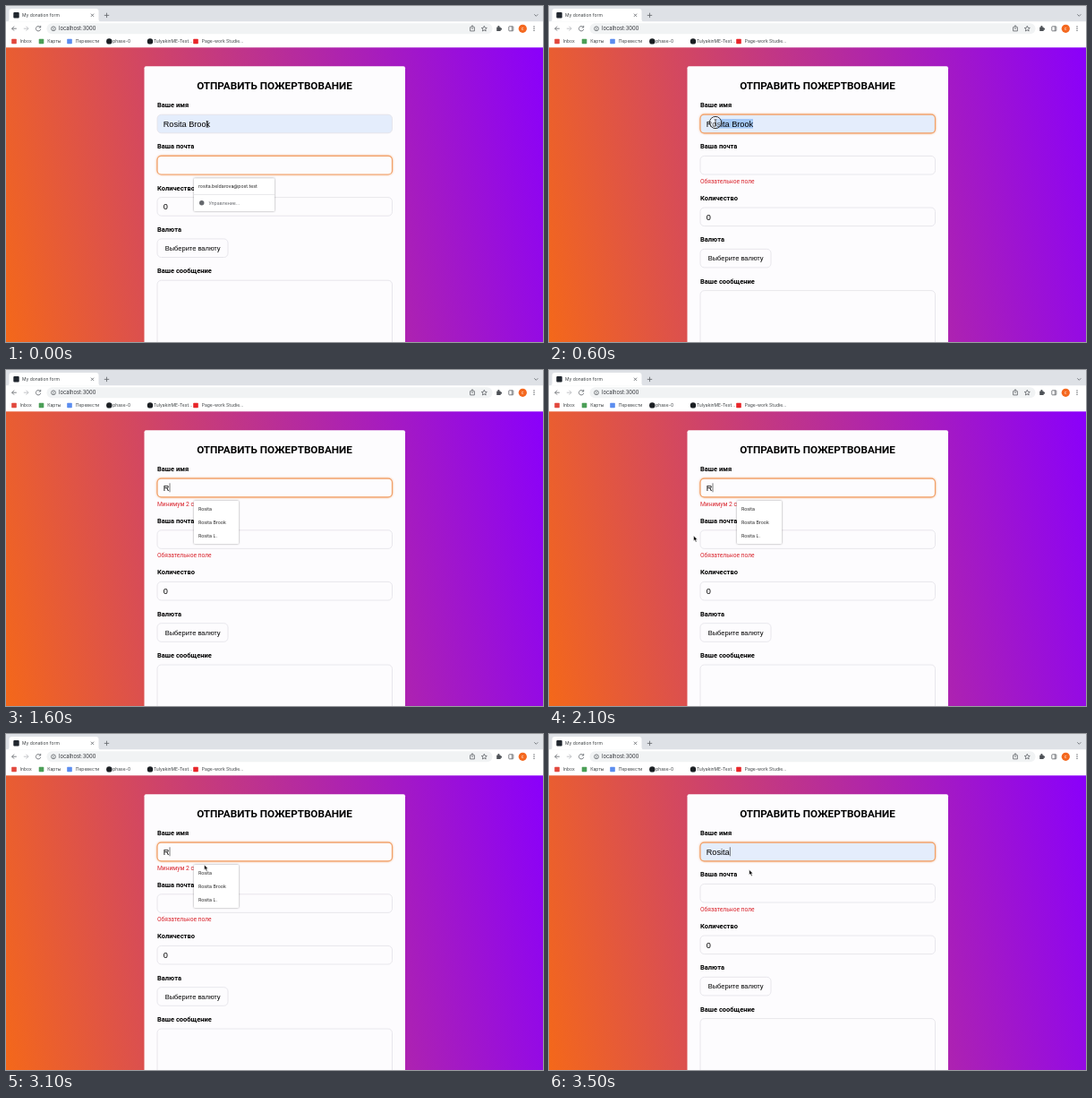
Animation, 600 px wide and 375 px high, one loop 3.6 s. Source, as an HTML page:

```html
<!DOCTYPE html>
<html lang="ru">
<head>
<meta charset="utf-8">
<title>My donation form</title>
<style>
html, body { margin: 0; width: 100%; height: 100%; overflow: hidden; background: #fff }
svg { display: block; width: 600px; height: 375px }
.ui { font-family: Inter, Roboto, sans-serif }
.page { font-family: Roboto, Arial, sans-serif }
.field { font-family: "Liberation Sans", Arial, sans-serif }
.line { fill: none; stroke: #5f6368; stroke-width: .8 }
.popup { filter: drop-shadow(0 .8px 1px #0006) }
.glow { filter: drop-shadow(0 0 .8px #f08a3caa) }
</style>
</head>
<body>
<svg viewBox="0 0 600 375">
  <defs>
    <linearGradient id="bg" gradientUnits="userSpaceOnUse" x1="-20" y1="279" x2="620" y2="143">
      <stop stop-color="#f4681a"/><stop offset="1" stop-color="#8a00fb"/>
    </linearGradient>
  </defs>
  <rect y="46" width="600" height="329" fill="url(#bg)"/>
  <g id="browser"></g>
  <rect x="154.5" y="67.3" width="291.5" height="320" rx="2" fill="#fdfcfe"/>
  <g id="form"></g>
</svg>
<script>
const $ = id => document.getElementById(id);

// y is the middle of the capital letters
const text = (s, x, y, size, cls, fill = '#000', extra = '') =>
  `<text x="${x}" y="${y + size * .36}" font-size="${size}" class="${cls}" fill="${fill}" ${extra}>${s}</text>`;
const rect = (x, y, w, h, fill, rx = 0, extra = '') =>
  `<rect x="${x}" y="${y}" width="${w}" height="${h}" rx="${rx}" fill="${fill}" ${extra}/>`;
const dot = (x, y, r, fill, extra = '') =>
  `<circle cx="${x}" cy="${y}" r="${r}" fill="${fill}" ${extra}/>`;
const line = (d, extra = '') => `<path d="${d}" class="line" ${extra}/>`;

function browser() {
  const pale = 'style="stroke:#b5b8bc"';
  const bookmarks = [
    [9, 'Inbox', '#e2483d'], [39.5, 'Карты', '#4c9f57'], [71, 'Перевести', '#5b8def'],
    [115.3, 'phase-0', '#1b1f23', 1], [161, 'TulyakinME-Test...', '#1b1f23', 1],
    [212, 'Page-work Studie...', '#e8262a']
  ];
  return rect(0, 0, 600, 17.5, '#dee1e6') + rect(0, 17.5, 600, 28.8, '#fff') +
    '<path d="M1 17.6q2.500 0 2.500-3V6q0-3 3-3h94q3 0 3 3v8.600q0 3 2.500 3z" fill="#fff"/>' +
    rect(8.3, 7, 6.4, 6.6, '#20262e', 1) +
    text('My donation form', 18, 10.5, 5, 'ui', '#3c4043') +
    line('M94.9 8.700l3.200 3.200m0-3.200l-3.200 3.200M109.800 10.400h5.400m-2.700-2.700v5.400M590.300 9.300l2 2 2-2') +
    line('M11.800 25.200H6.600m2.500-2.500l-2.500 2.500 2.500 2.500') +
    line('M19.800 25.200H25m-2.500-2.500l2.500 2.500-2.500 2.500', pale) +
    line('M38.300 23.700a2.700 2.700 0 1 0 .4 2.200M38.700 21.900v2.100h-2.100') +
    rect(45.5, 19.3, 498, 12, '#f1f3f4', 6) +
    dot(53, 25.3, 2.4, 'none', 'class="line"') + line('M53 25v1.500M53 23.800v.6') +
    text('localhost:3000', 59, 25.3, 5.85, 'ui', '#303338') +
    line('M519.800 23.700h-1.200v4.200h4.800v-4.200h-1.200M521 26v-4.200m-1.500 1.400l1.500-1.500 1.500 1.500') +
    line('M534.300 22.300l.9 2 2.100.2-1.600 1.400.5 2.100-1.900-1.100-1.900 1.100.5-2.100-1.600-1.400 2.100-.2z') +
    rect(548.2, 23.4, 4.5, 4.6, '#4d5156', .6) + dot(550.4, 23, 1.1, '#4d5156') + dot(553, 25.7, 1.1, '#4d5156') +
    rect(561.8, 22.8, 5, 5, 'none', .6, 'class="line"') + line('M565.300 22.800v5') +
    dot(577.3, 25.3, 4.6, '#f4681f') + text('c', 577.3, 24.9, 5, 'ui', '#fff', 'text-anchor="middle"') +
    [23, 25.2, 27.4].map(y => dot(590, y, .7, '#5f6368')).join('') +
    bookmarks.map(([x, name, color, round]) =>
      (round ? dot(x, 39.4, 3.2, color) : rect(x - 2.8, 36.8, 5.6, 5.4, color, .6)) +
      text(name, x + (round ? 4 : 6.7), 39.4, 5, 'ui', '#3c4043')).join('');
}

const label = (s, y) => text(s, 169, y, 7.5, 'page', '#000', 'font-weight="700"');
const error = (s, y) => text(s, 169, y, 6.67, 'page', '#d9222a');
const box = (y, { focus, fill = '#fdfcfe', w = 262.5, h = 20.6 } = {}) =>
  rect(169, y, w, h, fill, 4.5, focus
    ? 'stroke="#f1a068" stroke-width="1.2" class="glow"'
    : 'stroke="#e2e1e8" stroke-width=".8"');
const popup = (y, w, h) => rect(210, y, w, h, '#fff', 1, 'class="popup"');

// step, x, y of the pointer
const track = [
  [0, 225, 132], [1, 227, 132], [6, 186, 130], [9, 184, 131], [18, 183, 132],
  [21, 161.6, 185], [23, 161.6, 185], [25, 180, 149], [27, 186, 132],
  [31, 221.5, 146], [33, 223.7, 151.500], [36, 223.7, 151.500]
];
const within = (n, a, b) => n >= a && n < b;

function pointer(n) {
  if (within(n, 10, 18)) return '';
  const i = track.findIndex(k => k[0] > n), [a, ax, ay] = track[i - 1], [b, bx, by] = track[i];
  const k = (n - a) / (b - a), x = ax + (bx - ax) * k, y = ay + (by - ay) * k;
  const pressed = within(n, 1, 8) || [22, 27, 32].includes(n);
  const arrow = within(n, 20, 24) || n >= 29;
  const shape = arrow
    ? '<path d="M0 0v5.800l1.300-1.200 1.100 2.300 1.100-.5-1.100-2.200h1.800z" fill="#000" stroke="#fff" stroke-width=".5"/>'
    : '<path d="M-1.300-3.400q1.300 0 1.300.8v5.200q0 .8-1.300.8M1.300-3.400q-1.300 0-1.300.8m0 5.200q0 .8 1.300.8M-.9.8h1.800" fill="none" stroke="#222" stroke-width=".8"/>';
  return `<g transform="translate(${x} ${y})">` +
    (pressed ? dot(0, 0, 6.6, '#ffffff55', 'stroke="#333" stroke-width="1"') : '') + shape + '</g>';
}

function form(n) {
  const short = within(n, 15, 33);
  const name = short ? 'R' : n < 15 ? 'Rosita Brook' : 'Rosita';
  const mailFocus = n < 2, nameFocus = within(n, 2, 22) || n >= 27;
  const names = short && nameFocus;
  const mailY = short ? 11.4 : 0, y = mailY + (mailFocus ? 0 : 11.4);
  const selX = Math.max(182.6, 228 - (n - 1) * 8.2);

  let s = text('ОТПРАВИТЬ ПОЖЕРТВОВАНИЕ', 300, 88.6, 11.7, 'page', '#000',
    'font-weight="700" text-anchor="middle"');
  s += label('Ваше имя', 110.2) + box(121.2, { focus: nameFocus, fill: short ? '#fdfcfe' : '#e4edfc' });
  if (within(n, 2, 15)) s += rect(selX, 126, 228 - selX, 10.6, '#a5c8f6');
  s += text(name, 175.7, 131.4, 9.17, 'field');
  if (nameFocus && n >= 15) s += rect(short ? 182.7 : 201.9, 126.3, .6, 10, '#222');
  if (short) s += error('Минимум 2 символа', 149.2);

  s += label('Ваша почта', 156.5 + mailY) + box(167.4 + mailY, { focus: mailFocus });
  if (!mailFocus) s += error('Обязательное поле', 195.3 + mailY);
  s += label('Количество', 202.8 + y) + box(213.6 + y) + text('0', 175.7, 224 + y, 9.17, 'field');
  s += label('Валюта', 249.1 + y) + box(259.9 + y, { w: 79 }) +
    text('Выберите валюту', 177.7, 270.3 + y, 7.5, 'field');
  s += label('Ваше сообщение', 295.4 + y) + box(306.2 + y, { h: 100 });

  if (mailFocus) s += popup(192.3, 90, 36.7) +
    text('rosita.beldarova@post.test', 215, 201.2, 5.2, 'ui', '#222') +
    rect(210, 210, 90, .5, '#d4d4d8') + dot(218.7, 219.8, 2.7, '#66696e') +
    text('Управление...', 226.5, 219.8, 5.2, 'ui', '#66696e');
  if (names) s += popup(146, 50, 48) +
    (n == 32 ? rect(210, 147.5, 50, 15, '#e9eaec') : '') +
    ['Rosita', 'Rosita Brook', 'Rosita L.'].map((t, i) => text(t, 215, 155 + i * 15, 5.2, 'ui', '#222')).join('');
  return s + pointer(n);
}

$('browser').innerHTML = browser();
let shown = -1;
function draw() {
  const n = Math.floor(performance.now() % 3600 / 100);
  if (n != shown) $('form').innerHTML = form(shown = n);
  requestAnimationFrame(draw);
}
draw();
</script>
</body>
</html>
```
